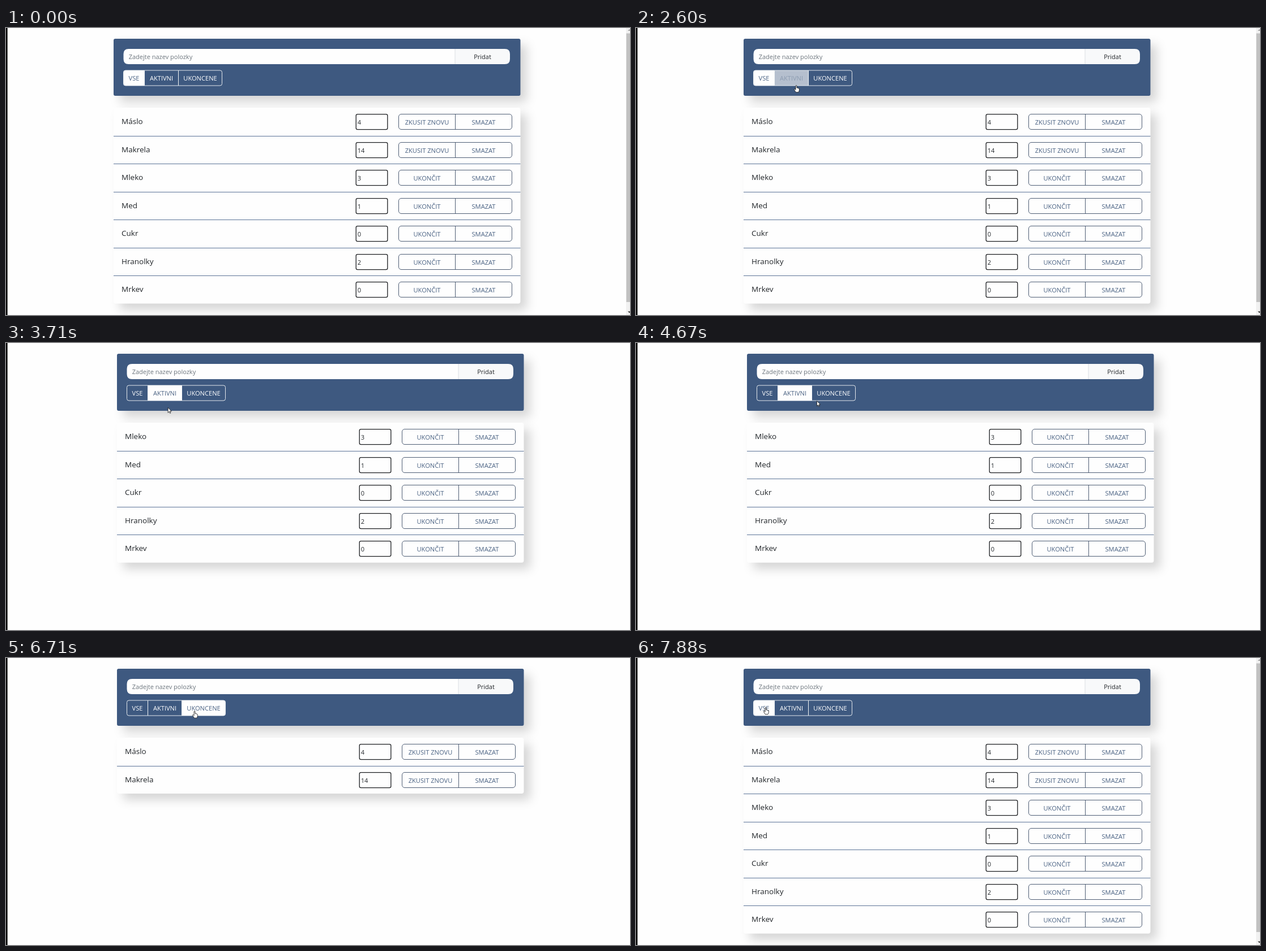
Recreate the animation shown at these times as an HTML page. Size 1102 by 508 pixels, loop 8 s.

```html
<!DOCTYPE html>
<html lang="cs">
<head>
<meta charset="utf-8">
<title>Nákupní seznam</title>
<style>
  html, body { margin: 0; width: 100%; height: 100%; overflow: hidden; background: #fefefe; }
  svg { display: block; width: 100%; height: 100%; font: 11px "Open Sans", "Noto Sans", sans-serif; }
  .panel { filter: drop-shadow(11px 11px 9px rgba(0, 0, 0, .16)); }
  .name { font-size: 13.5px; fill: #212529; }
  .count { fill: #212529; }
  .btn { font-size: 11.15px; fill: #4a6283; text-anchor: middle; }
  .tab { font-size: 11.1px; text-anchor: middle; }
  .box { fill: #fefefe; stroke: #1c1e21; stroke-width: 1.3; }
  .group { fill: none; stroke: #3c4c66; stroke-width: .9; }
  .rule { stroke: #5b7397; stroke-width: 1; }
  #cursor path { fill: #fff; stroke: #111; stroke-width: .8; stroke-linejoin: round; }
</style>
</head>
<body>
<svg viewBox="0 0 1102 508" id="stage"></svg>
<script>
const LOOP = 8000, FADE = 130, STEP = 70, LAG = 430, ROW = 49.55, SHIFT = 6;
const items = [
  ["Máslo", 4, true], ["Makrela", 14, true], ["Mleko", 3], ["Med", 1],
  ["Cukr", 0], ["Hranolky", 2], ["Mrkev", 0]
];
const tabs = [["VSE", 207.5, 244.5], ["AKTIVNI", 244.5, 304.5], ["UKONCENE", 304.5, 381.5]];

// When each tab is clicked; its list appears LAG later
const clicks = [{ at: -LAG, tab: 0 }, { at: 3070, tab: 1 }, { at: 5070, tab: 2 }, { at: 7450, tab: 0 }];

// Pointer legs: each runs from the place where the one before ended
const legs = [
  { start: 0, end: 0, x: 1034, y: 529 },
  { start: 970, end: 1450, x: 340, y: 124 },
  { start: 1850, end: 1850, x: 336.5, y: 118 },
  { start: 1920, end: 2600, x: 283, y: 101 },
  { start: 2680, end: 2820, x: 281, y: 99 },
  { start: 3500, end: 3850, x: 287.5, y: 120 },
  { start: 4250, end: 5020, x: 339.5, y: 90.3 },
  { start: 5500, end: 5980, x: 338.7, y: 93.8 },
  { start: 6710, end: 7470, x: 229, y: 87 }
];

const text = (cls, x, y, s) => `<text class="${cls}" x="${x}" y="${y}">${s}</text>`;
const rect = (x, y, w, h, rest) => `<rect x="${x}" y="${y}" width="${w}" height="${h}" ${rest}/>`;

function row([name, count, done], i) {
  const rule = i ? `<path class="rule" d="M190 .5H908.5"/>` : "";
  return `<g transform="translate(0 ${Math.round(141 + i * ROW)})">${rule}
    ${text("name", 204, 29.3, name)}
    ${rect(618.2, 11.6, 55.6, 27, 'rx="2.6" class="box"')}
    ${text("count", 620.7, 29.7, count)}
    ${rect(693.5, 11.5, 200, 27, 'rx="4.5" class="group"')}
    <path class="group" d="M793.5 11.5v27"/>
    ${text("btn", 743.5, 29.7, done ? "ZKUSIT ZNOVU" : "UKONČIT")}
    ${text("btn", 843.5, 29.7, "SMAZAT")}</g>`;
}

function list(rows) {
  return `<g class="list">${rect(190, 141, 718.5, rows.length * ROW, 'rx="4" fill="#fefefe" class="panel"')}
    ${rows.map(row).join("")}</g>`;
}

function tab([label, a, b], i) {
  const l = i == 0 ? 3.5 : 0, r = i == 2 ? 3.5 : 0;
  const d = `M${a + l} 75H${b - r}q${r} 0 ${r} ${r}V${102 - r}q0 ${r} ${-r} ${r}H${a + l}q${-l} 0 ${-l} ${-l}V${75 + l}q0 ${-l} ${l} ${-l}z`;
  return `<path class="fill" fill="#fefefe" stroke="#f4f6f8" stroke-width=".9" d="${d}"/>
    ${text("tab", (a + b) / 2, 93, label)}`;
}

const stage = document.getElementById("stage");
stage.innerHTML = `
  ${rect(0, 0, 1102, 508, 'fill="#fefefe"')}
  ${rect(0, 0, 2.6, 508, 'fill="#000"')}
  <g id="page">
    ${rect(190, 19, 718.5, 101, 'rx="3" fill="#3e5980" class="panel"')}
    <path fill="#fefefe" d="M793 37H216.5q-9 0-9 9v9q0 9 9 9H793z"/>
    <path fill="#f8f9fa" d="M793 37h88q9 0 9 9v9q0 9-9 9h-88z"/>
    <path stroke="#d3d8dd" stroke-width=".8" d="M793 37v27"/>
    <text x="216.7" y="55" fill="#6c757d">Zadejte nazev polozky</text>
    <text x="841.5" y="55" fill="#212529" text-anchor="middle">Pridat</text>
    ${tabs.map(tab).join("")}
    ${list(items)}${list(items.filter(x => !x[2]))}${list(items.filter(x => x[2]))}
  </g>
  <g id="bar">
    ${rect(1095, 0, 7, 508, 'fill="#f1f1f1"')}
    ${rect(1095.5, 9.5, 6.5, 475.5, 'fill="#c1c1c1"')}
    <path fill="#a3a3a3" d="M1098 5l3-3 1 1v2z"/>
    <path fill="#404040" d="M1098 501.5h4v2l-1 1z"/>
  </g>
  <g id="cursor">
    <path id="arrow" d="M.5.5V9.6L2.6 7.6 4 10.6 5.3 10 4 7H6.7z"/>
    <path id="hand" d="M-1 1.2Q0-.3 1 1.2V5Q2.2 4.2 2.8 5.4 4 4.8 4.2 6 5.3 5.8 5.3 7V9.2Q5 11 4 12.7H-.8Q-1.6 11-3.6 8.2-3.8 6.8-2.4 7.1L-1 8.4z"/>
  </g>`;

const $ = id => document.getElementById(id);
const fills = stage.querySelectorAll(".fill");
const labels = stage.querySelectorAll(".tab");
const lists = stage.querySelectorAll(".list");
const show = (el, on) => el.style.display = on ? "" : "none";
const mix = (a, b, p) => a + (b - a) * p;
const smooth = p => p * p * (3 - 2 * p);
const chosen = t => clicks.findLast(c => t >= c.at)?.tab ?? 0;
const view = t => chosen(t - LAG);

function pointer(t) {
  const i = legs.findLastIndex(l => t >= l.start);
  if (i < 1) return null;
  const { start, end, x, y } = legs[i], from = legs[i - 1];
  const n = Math.round((end - start) / STEP) + 1;
  const k = t >= end ? n : Math.floor((t - start) / (end - start) * (n - 1) + .01) + 1;
  const p = (k / n + smooth(k / n)) / 2;
  return { x: mix(from.x, x, p), y: mix(from.y, y, p) };
}

function hovered(t) {
  const at = pointer(t);
  if (!at || at.y < 75 || at.y > 102) return -1;
  const x = at.x - (view(t) ? SHIFT : 0);
  return tabs.findIndex(([, a, b]) => x >= a && x < b);
}

// Share of the last FADE ms in which a tab was chosen or hovered
function level(i, t) {
  const n = 12;
  let lit = 0;
  for (let j = 0; j < n; j++) {
    const s = t - j * FADE / n;
    if (chosen(s) == i || hovered(s) == i) lit++;
  }
  return smooth(lit / n);
}

function draw(t) {
  const shown = view(t);
  $("page").setAttribute("transform", `translate(${shown ? SHIFT : 0} 0)`);
  show($("bar"), !shown);
  lists.forEach((el, i) => show(el, i == shown));
  fills.forEach((el, i) => {
    const v = level(i, t);
    el.setAttribute("fill-opacity", v);
    labels[i].setAttribute("fill", `rgb(${mix(255, 74, v)},${mix(255, 98, v)},${mix(255, 131, v)})`);
    labels[i].setAttribute("font-weight", v < .5 ? 500 : 400);
  });
  const at = pointer(t);
  show($("cursor"), at);
  if (!at) return;
  const over = hovered(t) >= 0;
  show($("hand"), over);
  show($("arrow"), !over);
  $("cursor").setAttribute("transform", `translate(${at.x} ${at.y})`);
}

const begin = performance.now();
function tick() {
  draw((performance.now() - begin) % LOOP);
  requestAnimationFrame(tick);
}
tick();
</script>
</body>
</html>
```
